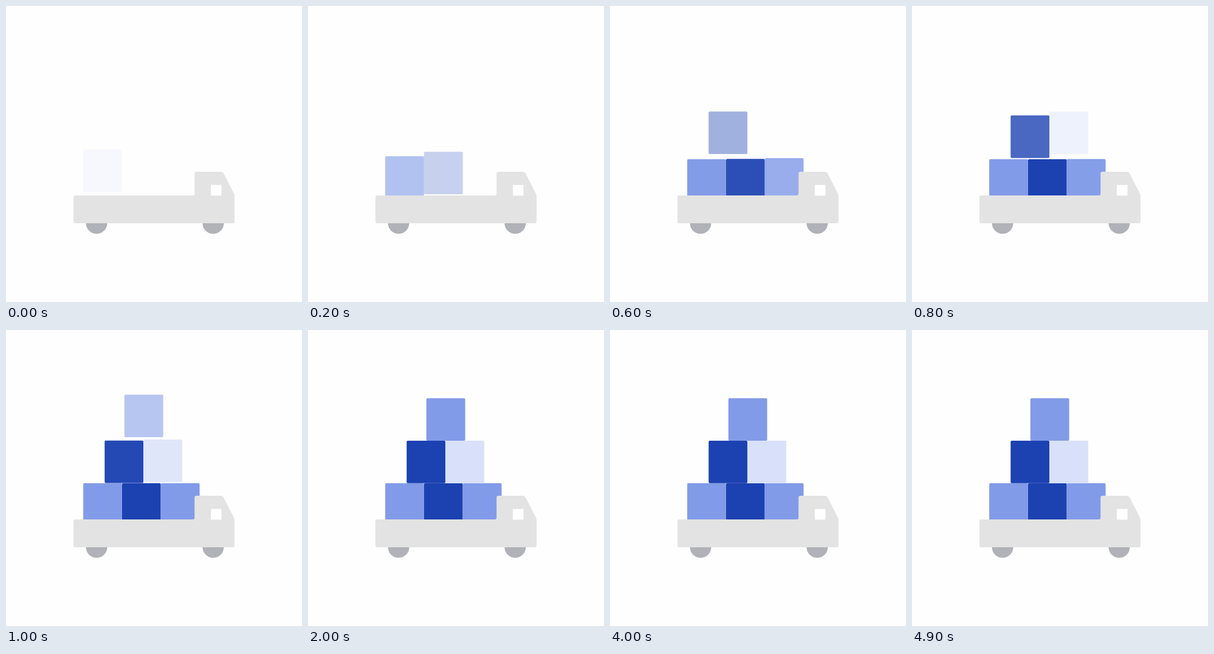
An HTML page that plays this animation: 500x500 px, repeating every 5 s.

```html
<!DOCTYPE html>
<html lang="en">
<head>
<meta charset="utf-8">
<title>Truck loading</title>
<style>
  html, body { margin: 0; width: 100%; height: 100%; overflow: hidden; background: #fefefe; }
  svg { display: block; width: 100vw; height: 100vh; }
</style>
</head>
<body>
<svg viewBox="0 0 500 500">
  <g id="boxes"></g>
  <g fill="#b0b2b8">
    <circle cx="153" cy="366.8" r="18"/>
    <circle cx="350" cy="366.8" r="18"/>
  </g>
  <path fill="#e3e3e3" d="M117 320H315.500Q318.500 320 318.500 317V283Q318.500 280 321.500 280H363Q366 280 367.500 282.500L385 317Q386 319 386 321V364Q386 367 383 367H117Q114 367 114 364V323Q114 320 117 320Z"/>
  <rect x="346" y="302.300" width="18" height="18" fill="#fff"/>
</svg>
<script>
const LOOP = 5000, STEP = 100, FALL_TIME = 800, DROP = 18;
const MID = '#829be8', DARK = '#1c42b2', PALE = '#d9e0f9';

// x, y, colour, start of the fall in ms
const boxes = [
  [130.4, 258.8, MID, -16],
  [196, 258.8, DARK, 130],
  [261.5, 258.8, MID, 257],
  [166.6, 187, DARK, 470],
  [232.2, 187, PALE, 662],
  [200, 115.2, MID, 807]
].map(([x, y, fill, start]) => {
  const node = document.createElementNS('http://www.w3.org/2000/svg', 'rect');
  const attributes = { x, y, fill, width: 65.5, height: 71.8, rx: 2 };
  for (const name in attributes) node.setAttribute(name, attributes[name]);
  document.getElementById('boxes').append(node);
  return { node, y, start };
});

function draw() {
  // The motion advances at ten poses per second.
  const time = Math.floor(performance.now() % LOOP / STEP) * STEP;
  for (const { node, y, start } of boxes) {
    const progress = Math.min(1, Math.max(0, (time - start) / FALL_TIME));
    const left = 1 - progress;
    node.setAttribute('y', y - DROP * left ** 4);
    node.setAttribute('opacity', 1 - left ** 3);
  }
  requestAnimationFrame(draw);
}
draw();
</script>
</body>
</html>
```
